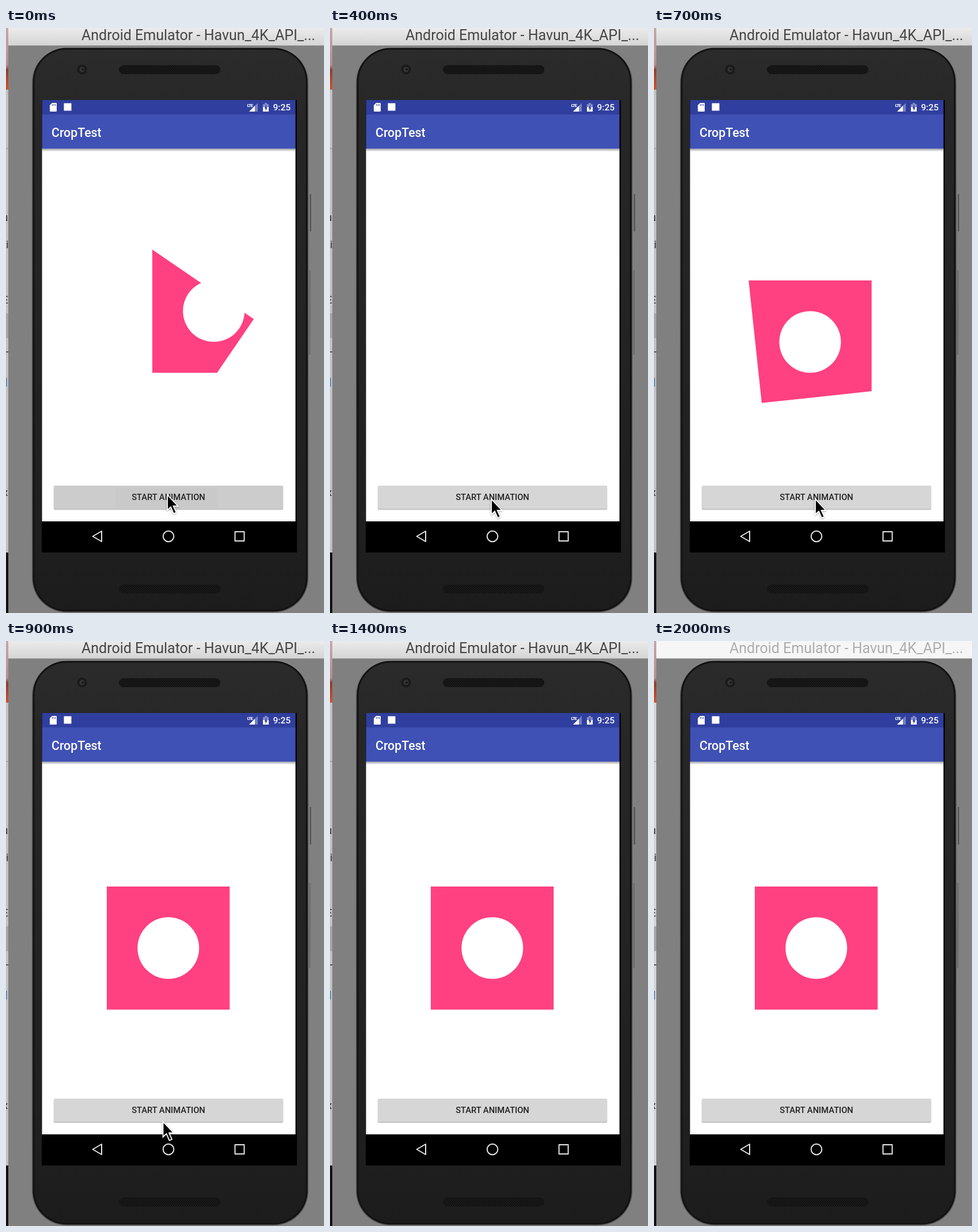
An HTML page for the animation above (2.1 s loop, 552 by 1015 pixels).

```html
<!DOCTYPE html>
<html lang="en">
<head>
<meta charset="utf-8">
<title>CropTest</title>
<style>
  html, body { margin: 0; width: 100%; height: 100%; overflow: hidden; background: #808080; }
  svg { display: block; width: 100%; height: 100%; }
  text { font-family: Roboto, sans-serif; }
  .medium { font-weight: 500; }
  .line { fill: none; stroke: #e4e4e4; stroke-width: 2; stroke-linejoin: round; }
  #cursor { filter: drop-shadow(0 1.5px 1.5px rgba(0, 0, 0, .35)); }
</style>
</head>
<body>
<svg viewBox="0 0 552 1015">
  <defs>
    <linearGradient id="titleFill" x2="0" y2="1">
      <stop offset="0" stop-color="#ebebeb"/><stop offset="1" stop-color="#d5d5d5"/>
    </linearGradient>
    <linearGradient id="bodyFill" x2="0" y2="1">
      <stop offset="0" stop-color="#2b2b2b"/><stop offset=".12" stop-color="#272727"/>
      <stop offset=".88" stop-color="#1f1f1f"/><stop offset="1" stop-color="#1c1c1c"/>
    </linearGradient>
    <linearGradient id="rimFill" x2="0" y2="1">
      <stop offset="0" stop-color="#8a8a8a"/><stop offset=".07" stop-color="#5a5a5a"/>
      <stop offset=".5" stop-color="#4c4c4c"/><stop offset="1" stop-color="#585858"/>
    </linearGradient>
    <linearGradient id="photoFill" x2="0" y2="1">
      <stop offset="0" stop-color="#c9a5a8"/><stop offset=".6" stop-color="#b98c8c"/>
      <stop offset=".68" stop-color="#8e3d2c"/><stop offset="1" stop-color="#d2532c"/>
    </linearGradient>
    <linearGradient id="barShade" x2="0" y2="1">
      <stop offset="0" stop-opacity=".36"/><stop offset="1" stop-opacity="0"/>
    </linearGradient>
    <pattern id="mesh" width="4" height="4" patternUnits="userSpaceOnUse">
      <rect width="4" height="4" fill="#1d1d1d"/>
      <circle cx="1" cy="1" r="1" fill="#090909"/><circle cx="3" cy="3" r="1" fill="#090909"/>
    </pattern>
    <clipPath id="strip"><path d="M0 0H4V1015H0Z"/></clipPath>
    <clipPath id="crop"><path d="M175 426H388.5V639.8H175Z"/></clipPath>
  </defs>

  <!-- window behind -->
  <g clip-path="url(#strip)">
    <rect id="page" width="4" height="910"/>
    <rect width="4" height="107" fill="url(#photoFill)"/>
    <path d="M0 209H4" stroke="#8a8a8a"/>
    <path d="M0 495H4V538H0Z" fill="#a5a5a5"/>
    <path d="M0 562H4" stroke="#333" stroke-width="1.5"/>
    <path d="M0 607H1.5V622H0Z" fill="#4b7fae"/>
    <g font-size="19" fill="#333">
      <text x="-7" y="335">u</text><text x="0" y="382">i</text>
      <text x="-7" y="478">E</text><text x="-6" y="812">x</text>
    </g>
    <rect y="910" width="4" height="105" fill="#111"/>
  </g>

  <!-- emulator window -->
  <rect x="4" y="30" width="548" height="985" fill="#808080"/>
  <rect id="titleBar" x="4" width="548" height="30"/>
  <path d="M4 30.5H552" stroke="#a0a0a0"/>
  <text id="title" x="131" y="20.5" font-size="25">Android Emulator - Havun_4K_API_...</text>

  <!-- phone -->
  <path d="M528.5 288V353" stroke="#4c4c4c" stroke-width="2"/>
  <path d="M527.5 420V567" stroke="#666" stroke-width="2"/>
  <rect x="45" y="33" width="480" height="981" rx="60" fill="url(#rimFill)"/>
  <rect x="46.5" y="34.5" width="477" height="978" rx="58.5" fill="#121212"/>
  <rect x="49.5" y="37.5" width="471" height="972" rx="55.5" fill="url(#bodyFill)"/>
  <circle cx="132" cy="72" r="8.5" fill="#1a1a1a"/>
  <circle cx="132" cy="72" r="4.5" fill="#343638"/>
  <circle cx="133" cy="72" r="2" fill="#161616"/>
  <g fill="url(#mesh)" stroke="#151515">
    <rect x="196.5" y="65" width="175" height="14.5" rx="7"/>
    <rect x="196.5" y="966" width="175" height="14.5" rx="7"/>
  </g>

  <!-- screen -->
  <rect x="62" y="125" width="443" height="785"/>
  <rect x="62.5" y="209" width="440" height="647" fill="#fff"/>
  <rect x="62.5" y="209.5" width="440" height="5" fill="url(#barShade)"/>
  <rect x="62.5" y="125" width="440" height="25" fill="#303f9f"/>
  <rect x="62.5" y="150" width="440" height="59.5" fill="#3f51b5"/>
  <g fill="#fff">
    <path d="M80 130H87Q88 130 88 131V144Q88 145 87 145H77Q76 145 76 144V134Z"/>
    <path d="M80.5 132V135M83 132V135M85.5 132V135" stroke="#303f9f"/>
    <rect x="100.5" y="130.5" width="13" height="13"/>
    <path d="M437 130V145H422Z" opacity=".35"/>
    <path d="M432 135V145H422Z"/>
    <text x="418.5" y="136.5" font-size="8" font-weight="700" letter-spacing="-1.2">LTE</text>
    <path d="M449 130H453V132H456V145H446V132H449Z" opacity=".4"/>
    <path d="M446 137H456V145H446Z"/>
    <path d="M452 133L448.5 139.5H450.5V144L454 137.5H452Z" fill="#303f9f"/>
    <text class="medium" x="463.5" y="143" font-size="15.5">9:25</text>
    <text class="medium" x="79" y="188.5" font-size="21.3">CropTest</text>
  </g>

  <!-- rotating crop window over upright artwork -->
  <g id="frame"><g clip-path="url(#crop)">
    <path id="art" fill="#ff4081" fill-rule="evenodd"
      d="M175 426H388.5V639.8H175ZM228.25 532.75a53.5 53.5 0 0 0 107 0a53.5 53.5 0 0 0 -107 0Z"/>
  </g></g>

  <rect x="82.5" y="795" width="399" height="41.5" rx="3" fill="#000" opacity=".12"/>
  <rect x="83" y="794.5" width="398" height="41" rx="2" fill="#000" opacity=".16"/>
  <rect id="button" x="83" y="794" width="398" height="40" rx="2"/>
  <rect id="ripple" x="190" y="796" width="177" height="36" fill="#c9c9c9"/>
  <text class="medium" x="282" y="819" font-size="14.7" text-anchor="middle" fill="#222">START ANIMATION</text>

  <g class="line">
    <path d="M150.5 882L166 873V891Z"/>
    <circle cx="282" cy="882" r="9.3"/>
    <path d="M397.5 874H413.5V890H397.5Z"/>
  </g>

  <path id="cursor" d="M0 0V26.5L6 21L11 32.5L15.5 30.5L10.5 19.5H18.5Z"
    stroke="#fff" stroke-width="1.8"/>
</svg>
<script>
  const LOOP = 2100, STEP = 100, PRESS_END = 1, BLUR_START = 18;
  // [first step, x, y] of the pointer tip
  const pointer = [
    [0, 280, 810], [1, 280, 817.5], [8, 277, 823], [9, 272.5, 834],
    [10, 270, 846], [11, 269, 857], [12, 268, 863], [13, 268, 920], [14, -50, -50]
  ];
  const $ = id => document.getElementById(id);
  const set = (id, name, value) => $(id).setAttribute(name, value);

  function turn(step) {
    const p = step < 8 ? Math.min(1, 0.2 + step * 0.1024) : 1;
    return p < 1 ? 180 * (1 - Math.cos(Math.PI * p)) : 0;
  }

  function draw(step) {
    const angle = turn(step);
    const pressed = step < PRESS_END;
    const blurred = step >= BLUR_START;
    const [, x, y] = pointer.findLast(row => row[0] <= step);

    set('frame', 'transform', `rotate(${angle} 281.75 532.75)`);
    set('art', 'transform', `rotate(${-angle} 175 426)`);
    set('frame', 'visibility', angle >= 90 && angle <= 270 ? 'hidden' : 'visible');
    set('cursor', 'transform', `translate(${x} ${y})`);
    set('button', 'fill', pressed ? '#ccc' : '#d6d6d6');
    set('ripple', 'visibility', pressed ? 'visible' : 'hidden');
    set('titleBar', 'fill', blurred ? '#f6f6f6' : 'url(#titleFill)');
    set('title', 'fill', blurred ? '#adadad' : '#454545');
    set('page', 'fill', blurred ? '#d2d2d2' : '#c0c0c0');
  }

  const start = performance.now();
  function tick() {
    draw(Math.floor((performance.now() - start) % LOOP / STEP));
    requestAnimationFrame(tick);
  }
  tick();
</script>
</body>
</html>
```
